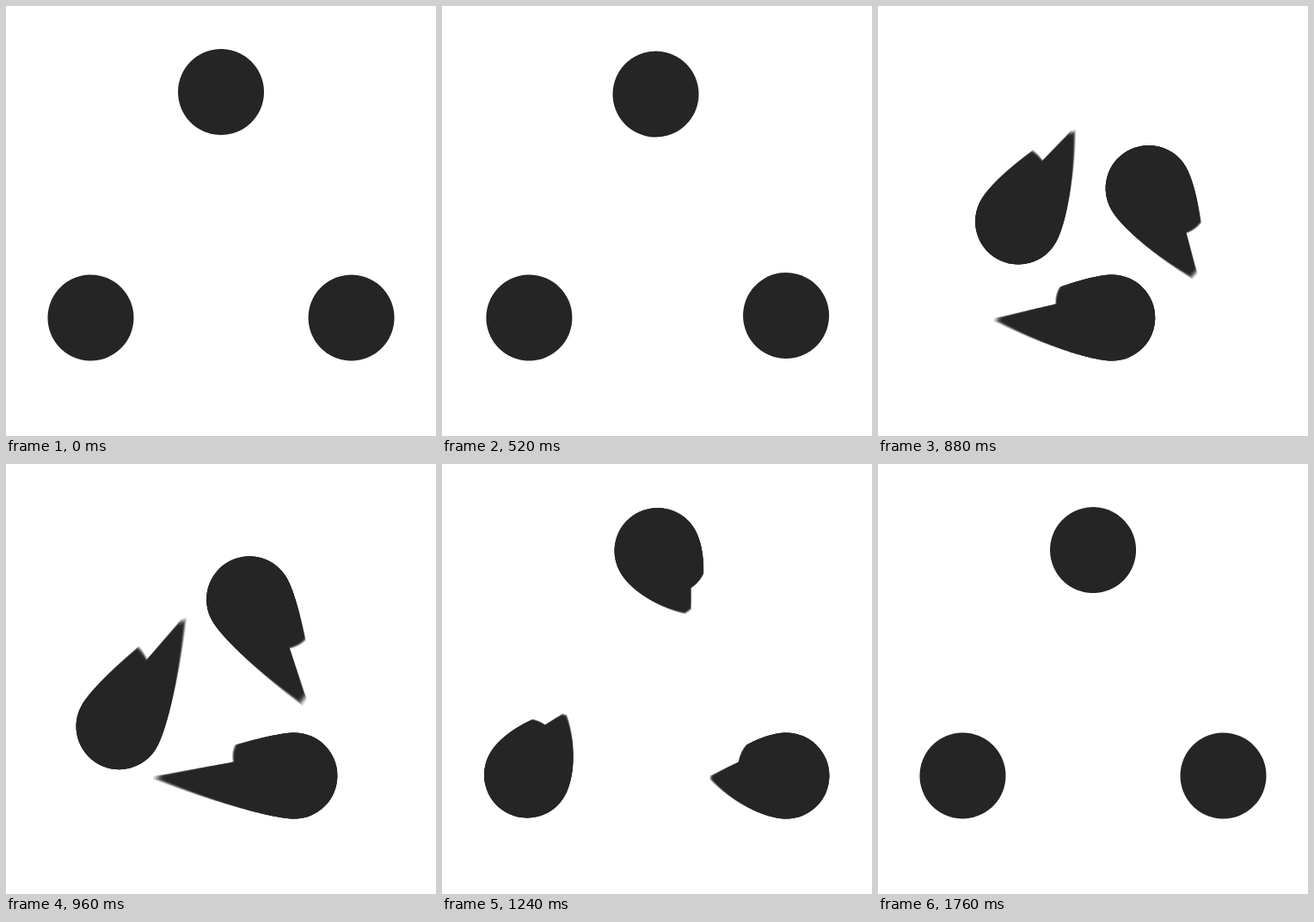
An HTML page with a canvas that plays this animation: 500 px wide and 500 px high, repeating every 1.8 s.

```html
<!DOCTYPE html>
<html>
<head>
<meta charset="utf-8">
<style>
html, body { margin: 0; height: 100%; overflow: hidden; background: #fff; }
canvas { display: block; }
</style>
</head>
<body>
<canvas id="stage" width="500" height="500"></canvas>
<script>
const ctx = document.getElementById('stage').getContext('2d');
const LOOP = 1800, STEP = 40, RADIUS = 50, SIDE = 303;
const START = 319, END = 1399;
const TAIL_START = 705, TAIL_PEAK = 960, TAIL_FADE = 272;

// Each ball travels along +x in its own frame; its pointed tail is split by one notch.
const balls = [
  { angle: 0, length: 120, notch: -16, width: 20, depth: 58 },
  { angle: -120, length: 104, notch: 12, width: 21, depth: 55 },
  { angle: 120, length: 106, notch: 11, width: 16, depth: 48 }
];

const clamp01 = v => Math.min(1, Math.max(0, v));
const easeInOutQuart = u => u < .5 ? 8 * u ** 4 : 1 - 8 * (1 - u) ** 4;
const smoothstep = u => u * u * (3 - 2 * u);

function stretchAt(t) {
  return t < TAIL_PEAK
    ? smoothstep(clamp01((t - TAIL_START) / (TAIL_PEAK - TAIL_START)))
    : Math.exp(-(((t - TAIL_PEAK) / TAIL_FADE) ** 2));
}

function tailLength({ length, notch, width, depth }, y) {
  const cone = length * (1 - Math.abs(y) / RADIUS);
  const cut = depth * Math.max(0, 1 - Math.abs(y - notch) / width);
  return Math.max(0, cone - cut);
}

// A disc whose rear edge is pulled backwards.
function fillBall(ball, stretch) {
  ctx.beginPath();
  ctx.arc(0, 0, RADIUS, -Math.PI / 2, Math.PI / 2);
  for (let a = 0; a <= 180; a++) {
    const angle = a * Math.PI / 180;
    const y = RADIUS * Math.cos(angle);
    ctx.lineTo(-RADIUS * Math.sin(angle) - stretch * tailLength(ball, y), y);
  }
  ctx.fill();
}

function draw(now) {
  const t = Math.floor(now % LOOP / STEP) * STEP;
  const x = SIDE * (easeInOutQuart(clamp01((t - START) / (END - START))) - .5);
  const stretch = stretchAt(t);

  ctx.clearRect(0, 0, 500, 500);
  ctx.fillStyle = '#252525';
  for (const ball of balls) {
    ctx.save();
    ctx.translate(250, 275);
    ctx.rotate(ball.angle * Math.PI / 180);
    ctx.translate(x, 87.5);
    // Shorter, denser layers leave a soft tip; the disc itself is drawn once, solid.
    if (stretch > .001) {
      for (let i = 1; i <= 5; i++) {
        ctx.globalAlpha = i / 5;
        fillBall(ball, stretch * (1.07 - .03 * i));
      }
    } else {
      fillBall(ball, 0);
    }
    ctx.restore();
  }
}

const begin = performance.now();
function tick() {
  draw(performance.now() - begin);
  requestAnimationFrame(tick);
}
tick();
</script>
</body>
</html>
```
